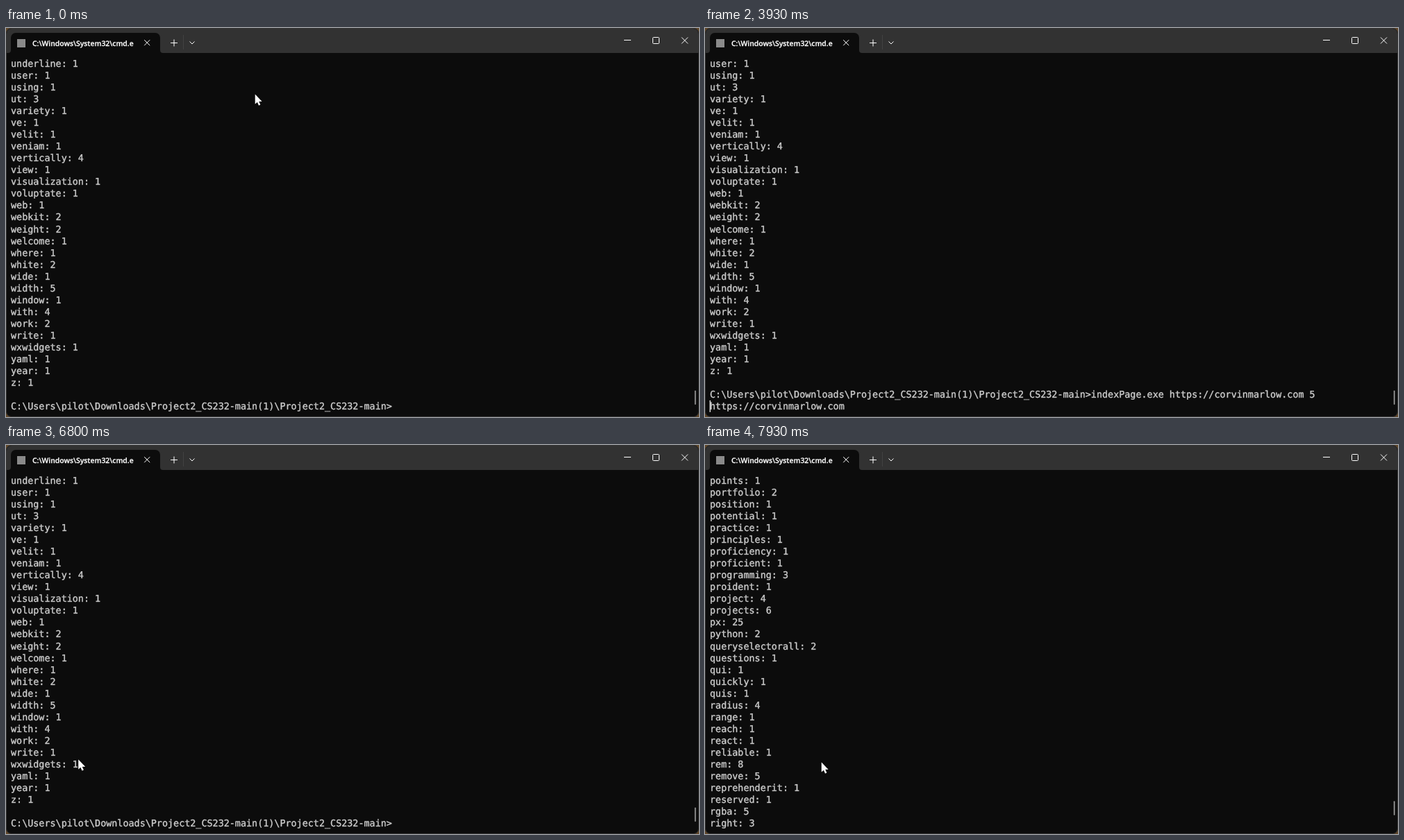
Animation of 998x561 px, one loop 8 s. Source, as an HTML page:

```html
<!DOCTYPE html>
<html lang="en">
<head>
<meta charset="utf-8">
<title>Terminal</title>
<style>
  html, body { margin: 0; width: 100%; height: 100%; overflow: hidden; background: #5e4528; }
  svg { display: block; width: 100vw; height: 100vh; }
  text { white-space: pre; text-rendering: geometricPrecision; }
  .term text { font: 13.42px "DejaVu Sans Mono", monospace; fill: #ccc; stroke: #ccc; stroke-width: .38; }
  .title { font: 600 10.4px "Open Sans", sans-serif; fill: #fff; stroke: #fff; stroke-width: .25; }
  .icon { fill: none; stroke: #fff; stroke-width: 1; }
</style>
</head>
<body>
<svg viewBox="0 0 998 561">
  <rect width="998" height="561" fill="#5e4528"/>
  <rect x=".5" y=".5" width="997" height="560" rx="7" fill="#0c0c0c" stroke="#333"/>
  <path d="M1 36V8a7 7 0 0 1 7-7H990a7 7 0 0 1 7 7V36Z" fill="#323232"/>
  <path d="M3 36a4 4 0 0 0 4-4V14a7 7 0 0 1 7-7H215a7 7 0 0 1 7 7V32a4 4 0 0 0 4 4Z" fill="#0c0c0c"/>
  <rect x="16" y="16" width="12" height="12" fill="#8a8a8a"/>
  <text class="title" x="38" y="26">C:\Windows\System32\cmd.e</text>
  <path d="M255.5 10V31" stroke="#424242"/>
  <g class="icon">
    <path d="M199.2 17.2l8 8m0-8l-8 8"/>
    <path d="M237 21.5h10m-5-5v10"/>
    <path d="M264.5 19.5l3.5 3.5 3.5-3.5"/>
    <path d="M890 17.5h10"/>
    <rect x="931.5" y="13.5" width="9" height="9" rx="1"/>
    <path d="M973 13.5l9 9m0-9l-9 9"/>
  </g>
  <g class="term" id="term"></g>
  <rect id="caret" width="1.2" height="17" fill="#fff"/>
  <rect id="thumb" x="991.8" width="1.7" height="20.5" rx=".8" fill="#9c9c9c"/>
  <path id="pointer" d="M0 0V14.2L3.2 11.3 5.3 16.2 7.7 15.2 5.6 10.5H10Z" fill="#fff" stroke="#000" stroke-width="1" paint-order="stroke"/>
</svg>
<script>
const LOOP = 8000, FPS = 15, ROWS = 30, CELL = 8.08, ROW = 17.03, LEFT = 7, TOP = 43.2;
const PROMPT = 'C:\\Users\\pilot\\Downloads\\Project2_CS232-main(1)\\Project2_CS232-main>';
const URL_TEXT = 'https://corvinmarlow.com';
const COMMAND = 'indexPage.exe ' + URL_TEXT + ' ';

// Words with a count; no count means 1.
const WORDS = `points portfolio:2 position potential practice principles proficiency
proficient programming:3 proident project:4 projects:6 px:25 python:2 queryselectorall:2
questions qui quickly quis radius:4 range reach react reliable rem:8 remove:5
reprehenderit reserved rgba:5 right:3
role rotate running sans scale:2 school scroll:2 section:4 security selector serif server
several shadow:4 show simple since sint sit size:3 skills:2 smooth software:4 space
spacing spans stack:5 stays style styling sunt systems teams technical:5 technologies:2
technology tempor test text:10 the:11 them then
there these they this:3 time to:9 tools:2 top:4 transform:2 transition:2 two type
underline user using ut:3 variety ve velit veniam vertically:4 view visualization
voluptate web webkit:2 weight:2 welcome where white:2 wide width:5 window with:4 work:2
write wxwidgets yaml year z`.split(/\s+/).map(w => {
  const [word, count = 1] = w.split(':');
  return word + ': ' + count;
});
const END = WORDS.length + 2 - ROWS;

// Pointer path: time, x, y
const PATH = [
  [0, 358, 95], [67, 366, 103], [200, 470, 215], [333, 632, 390], [467, 733, 500],
  [533, 744, 513], [667, 745, 513], [4867, 740, 512], [5067, 650, 482], [5200, 612, 470],
  [5333, 612, 471], [5600, 611, 471], [6000, 580, 466], [6400, 549, 462], [6667, 549, 462],
  [6800, 103.5, 453], [7000, 168, 455], [7270, 168, 455], [7600, 167, 457], [8000, 167, 457]
];

const $ = id => document.getElementById(id);
const rows = Array.from({ length: ROWS }, (_, i) => {
  const row = document.createElementNS('http://www.w3.org/2000/svg', 'text');
  row.setAttribute('x', LEFT);
  row.setAttribute('y', TOP + 12.9 + i * ROW);
  return $('term').appendChild(row);
});
const show = (id, on) => $(id).setAttribute('visibility', on ? 'visible' : 'hidden');
const ramp = (t, a, b) => Math.min(1, Math.max(0, (t - a) / (b - a)));

function pointerAt(t) {
  const i = Math.max(1, PATH.findIndex(p => p[0] >= t));
  const [a, b] = [PATH[i - 1], PATH[i]];
  const k = ramp(t, a[0], b[0]);
  return [a[1] + (b[1] - a[1]) * k, a[2] + (b[2] - a[2]) * k];
}

function inputAt(f) {
  if (f < 16 || f >= 59) return '';
  return COMMAND + (f < 34 ? '2' : f < 45 ? '' : '5');
}

function caretOn(f) {
  if (f < 16) return f >= 7 && f < 15;
  if (f < 62) return !(f >= 27 && f < 29) && !(f >= 51 && f < 59);
  return Math.floor((f - 62) / 8) % 2 === 0;
}

function scrollAt(t, f) {
  if (f === 60) return 0;
  if (f === 61) return END / 2;
  const k = (ramp(t, 6867, 7266) + ramp(t, 7333, 7933)) / 2;
  return END - 3 * Math.round(END * k / 3);
}

function draw(ms) {
  const f = Math.floor((ms % LOOP + 5) * FPS / 1000) % (LOOP * FPS / 1000);
  const t = f * 1000 / FPS;
  const running = f === 59;
  const input = inputAt(f);
  const lines = running
    ? [...WORDS, '', PROMPT + COMMAND + '5', URL_TEXT]
    : [...WORDS, '', PROMPT + input];
  const top = running ? END + 1 : scrollAt(t, f);
  rows.forEach((row, i) => { row.textContent = lines[top + i]; });

  const col = running ? 0 : PROMPT.length + (f >= 29 && f < 45 ? COMMAND.length : input.length);
  $('caret').setAttribute('x', LEFT + col * CELL - .3);
  $('caret').setAttribute('y', TOP + (ROWS - 1) * ROW - .1);
  show('caret', caretOn(f) && top >= END);

  $('thumb').setAttribute('y', 513.5 + 9.3 * Math.min(1, (f < 65 ? END : top) / END));

  const [x, y] = pointerAt(t);
  $('pointer').setAttribute('transform', `translate(${x + .7} ${y + .6})`);
  show('pointer', f < 46 || f >= 73);
}

const start = performance.now();
function tick() {
  draw(performance.now() - start);
  requestAnimationFrame(tick);
}
tick();
</script>
</body>
</html>
```
